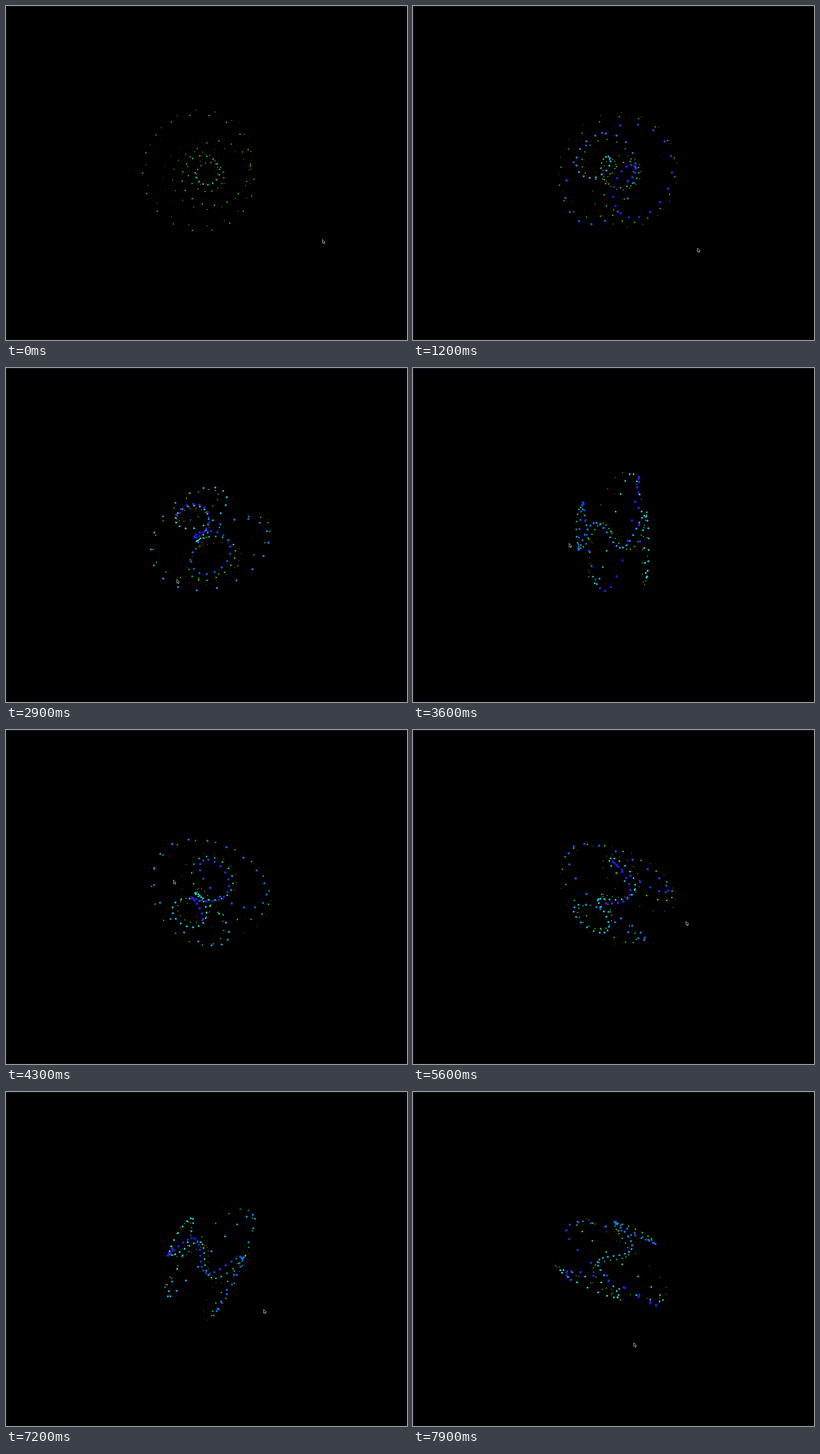
Write an HTML page with a canvas that moves like this. It is 600x500 px and loops after 8 s.

```html
<!DOCTYPE html>
<html lang="en">
<head>
<meta charset="utf-8">
<title>Dot trail</title>
<style>
  html, body { margin: 0; width: 100%; height: 100%; overflow: hidden; background: #000; }
  canvas { display: block; width: 600px; height: 500px; }
</style>
</head>
<body>
<canvas id="stage" width="600" height="500"></canvas>
<script>
const ctx = document.getElementById('stage').getContext('2d');
const LOOP = 8000, TICK = 100;
const CX = 300, CY = 250;
const LAP = 64;          // dots in one round over the ring
const FIRST = 33;        // dots between the first one and the outer rim
const WINDINGS = 4;      // turns about the axis in one round
const MAX_AGE = 220;
const RAD = Math.PI / 180;

const lerp = (a, b, u) => a + (b - a) * u;
const clamp = (v, lo, hi) => Math.min(hi, Math.max(lo, v));

// time, dots emitted, screen direction of the axis, its tilt, spin about it
const poses = [
  [0, 0, 20, 0, 314],
  [1900, 91, 35, 71, 289],
  [2900, 139, 58, 138, 338],
  [4300, 197, -53, 58, 187],
  [5600, 254, -55, 78, 232],
  [6500, 299.5, -55, 85, 253],
  [7900, 365.5, 117, 102, 260]
];

// time and tip of the pointer
const pointerPath = [
  [0, 473, 349], [900, 445, 364], [1900, 379, 357], [2700, 285, 346],
  [2900, 255, 316], [3600, 233, 262], [4300, 250, 224], [5600, 408, 286],
  [6500, 382, 272], [7200, 385, 325], [7900, 330, 375]
];

// Values of a keyed path at time t
function sample(path, t) {
  let k = 0;
  while (k < path.length - 2 && path[k + 1][0] <= t) k++;
  const a = path[k], b = path[k + 1];
  const u = clamp((t - a[0]) / (b[0] - a[0]), 0, 1);
  return a.slice(1).map((v, n) => lerp(v, b[n + 1], u));
}

// A coil that runs tightly through a ring's hole and widely around its rim
function place(s, age, [axis, tilt, spin]) {
  const laps = age / LAP;
  const psi = -2 * Math.PI * (s + FIRST) / LAP;
  const r = 40 * Math.exp(0.86 * Math.cos(psi));
  const z = -54 * Math.sin(psi - 0.3);
  const theta = WINDINGS * psi - 0.53 * Math.sin(psi) + spin * RAD - 0.8 * laps;
  const lean = tilt * RAD - 0.157 * laps;
  const across = r * Math.cos(theta);
  const along = r * Math.sin(theta) * Math.cos(lean) + z * Math.sin(lean);
  const c = Math.cos(axis * RAD), d = Math.sin(axis * RAD);
  return [CX + along * c - across * d, CY + along * d + across * c];
}

function drawDot(x, y, age) {
  const hue = 250 - 0.85 * age - 0.003 * age * age;
  const alpha = clamp((MAX_AGE - age) / 100, 0, 1);
  ctx.fillStyle = `hsla(${hue}, 90%, 53%, ${alpha})`;
  ctx.beginPath();
  ctx.arc(x, y, Math.max(0.6, 1.9 - 0.0088 * age), 0, 2 * Math.PI);
  ctx.fill();
}

function drawTrail(t) {
  const [count, ...view] = sample(poses, t);
  for (let s = Math.floor(count) - MAX_AGE; s <= count; s++) {
    const age = count - s;
    // dots from before the loop begins have already faded
    const fade = s > 0 ? age : Math.max(age, 90 - 0.55 * s);
    if (fade < MAX_AGE) drawDot(...place(s, age, view), fade);
  }
}

function drawPointer(t) {
  const [x, y] = sample(pointerPath, t);
  ctx.save();
  ctx.translate(x + 0.5, y + 0.5);
  ctx.beginPath();
  [[0, 0], [0, 5.5], [1.3, 4.5], [2.3, 6.6], [3.2, 6.2], [2.4, 4.2], [4, 4]]
    .forEach(p => ctx.lineTo(...p));
  ctx.closePath();
  ctx.fillStyle = '#000';
  ctx.fill();
  ctx.strokeStyle = '#b4b4b4';
  ctx.lineWidth = 0.8;
  ctx.stroke();
  ctx.restore();
}

function bar(color, x, y, w, h) {
  ctx.fillStyle = color;
  ctx.fillRect(x, y, w, h);
}

function drawBackground() {
  bar('#000', 0, 0, 600, 500);
  bar('#141414', 0, 0, 1, 500);
  bar('#0c0c0e', 0, 499, 600, 1);
  bar('#141a28', 0, 0, 600, 1);
}

const begin = performance.now();
function tick() {
  const t = Math.floor((performance.now() - begin) % LOOP / TICK) * TICK;
  drawBackground();
  drawTrail(t);
  drawPointer(t);
  requestAnimationFrame(tick);
}
tick();
</script>
</body>
</html>
```
